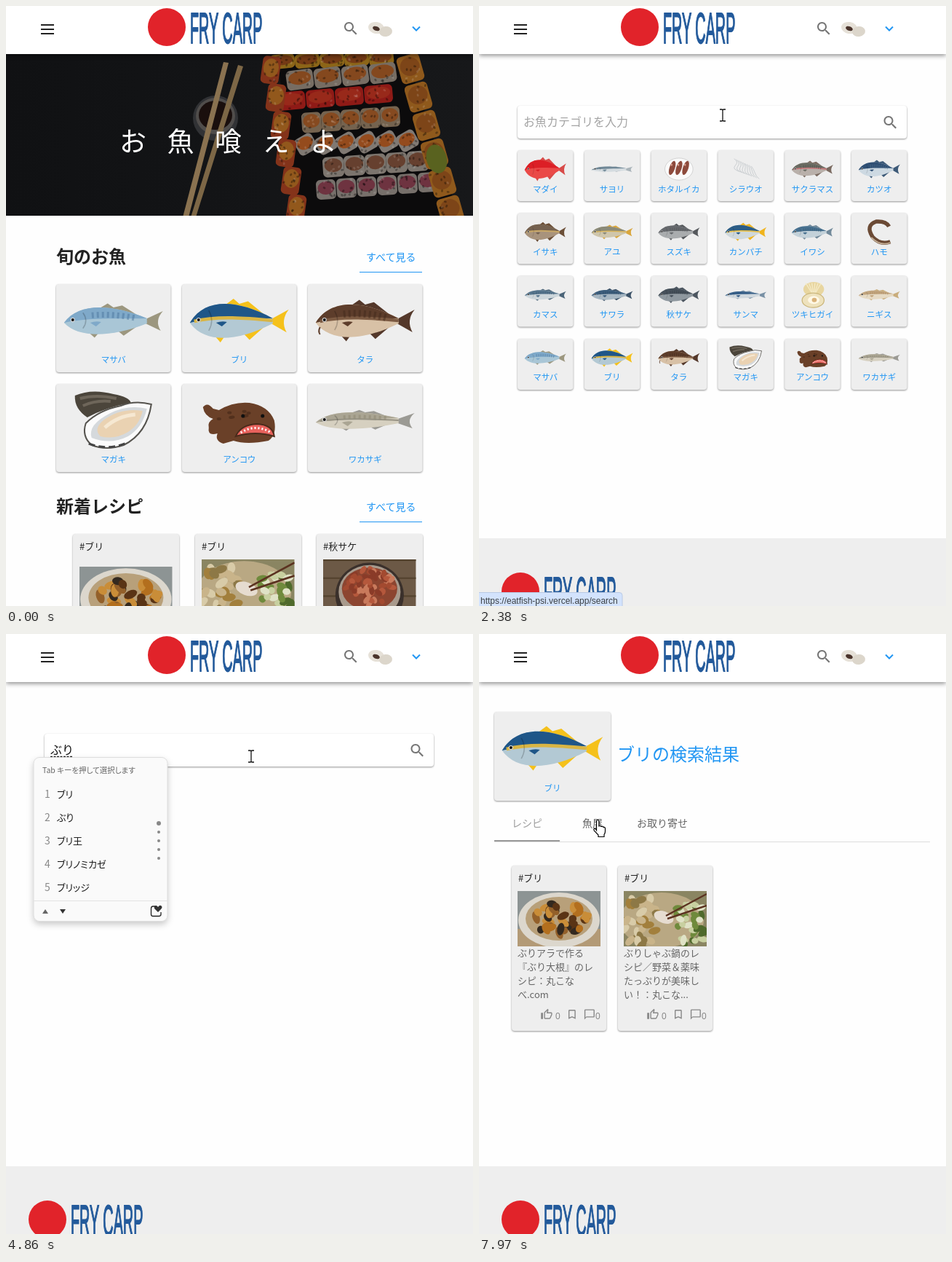
An HTML page for the animation above (8 s loop, 642 by 824 pixels).

```html
<!DOCTYPE html>
<html lang="ja">
<head>
<meta charset="utf-8">
<style>
html, body { margin: 0; width: 100%; height: 100%; overflow: hidden; background: #fff; }
svg { display: block; }
#stage { width: 642px; height: 824px; font-family: "Noto Sans CJK JP", "Noto Sans CJK", "Noto Sans", sans-serif; }
.card { filter: drop-shadow(0 1px 1px rgba(0,0,0,.42)); }
.link { fill: #2196f3; font-weight: 300; }
.mid { text-anchor: middle; }
.ime { font-feature-settings: "palt"; }
.latin { font-family: "Liberation Sans", Arial, sans-serif; }
</style>
</head>
<body>
<svg id="stage" viewBox="0 0 642 824" xmlns="http://www.w3.org/2000/svg"></svg>
<script>
const LOOP = 8000, BLUE = '#2196f3';
const stage = document.getElementById('stage');

let seed = 7;
const rnd = () => (seed = (seed * 16807) % 2147483647) / 2147483647;
const times = (n, f) => Array.from({ length: n }, (_, i) => f(i)).join('');

// basic shapes
const rect = (x, y, w, h, fill, r = 0, more = '') =>
  `<rect x="${x}" y="${y}" width="${w}" height="${h}" rx="${r}" fill="${fill}" ${more}/>`;
const oval = (x, y, rx, ry, fill, a = 0, more = '') =>
  `<ellipse rx="${rx}" ry="${ry}" fill="${fill}" transform="translate(${x} ${y}) rotate(${a})" ${more}/>`;
const path = (d, fill, more = '') => `<path d="${d}" fill="${fill}" ${more}/>`;
const line = (d, stroke, w = 1, more = '') => path(d, 'none', `stroke="${stroke}" stroke-width="${w}" ${more}`);
const text = (x, y, size, fill, s, more = '') =>
  `<text x="${x}" y="${y}" font-size="${size}" fill="${fill}" ${more}>${s}</text>`;
const move = (x, y, s, inner) => `<g transform="translate(${x} ${y}) scale(${s})">${inner}</g>`;
const group = (id, inner, more = '') => `<g id="${id}" ${more}>${inner}</g>`;

// icons
const LENS = 'M15.5 14h-.79l-.28-.27C15.41 12.59 16 11.11 16 9.5 16 5.91 13.09 3 9.5 3S3 5.91 3 9.5 5.91 16 9.5 16c1.61 0 3.09-.59 4.23-1.57l.27.28v.79l5 4.99L20.49 19l-4.99-5zm-6 0C7.01 14 5 11.99 5 9.5S7.01 5 9.5 5 14 7.01 14 9.5 11.99 14 9.5 14z';
const THUMB = 'M9 21h9c.83 0 1.54-.5 1.84-1.22l3.02-7.05c.09-.23.14-.47.14-.73v-2c0-1.1-.9-2-2-2h-6.31l.95-4.57.03-.32c0-.41-.17-.79-.44-1.06L14.17 1 7.58 7.59C7.22 7.95 7 8.45 7 9v10c0 1.1.9 2 2 2zM9 9l4.34-4.34L12 10h9v2l-3 7H9V9zM1 9h4v12H1z';
const MARK = 'M17 3H7c-1.1 0-2 .9-2 2v16l7-3 7 3V5c0-1.1-.9-2-2-2zm0 15-5-2.18L7 18V5h10v13z';
const CHAT = 'M20 2H4c-1.1 0-2 .9-2 2v18l4-4h14c1.1 0 2-.9 2-2V4c0-1.1-.9-2-2-2zm0 14H6l-2 2V4h16v12z';

// fish, 136 wide and centred on 0,0
function fish(h, back, belly, fin, stripe, bars) {
  const top = `M-68 3C-48 ${-1.35 * h} -4 ${-1.3 * h} 46 -3`;
  return path(`M42 -1L68 ${-5 - h * .45}Q56 0 65 ${6 + h * .45}L42 3Z`, fin) +
    path(`M-22 ${-.85 * h}L-8 ${-1.3 * h}L0 ${-h}L12 ${-1.15 * h}L36 ${-.3 * h}Z`, fin) +
    path(`M-36 ${.8 * h}L-26 ${1.3 * h}L-18 ${.8 * h}ZM4 ${.7 * h}L14 ${1.15 * h}L36 ${.3 * h}Z`, fin) +
    path(`${top}V4C-4 ${1.3 * h} -48 ${1.35 * h} -68 3Z`, belly) +
    path(`${top}C10 ${-.1 * h} -30 ${-.3 * h} -68 3Z`, back) +
    (stripe ? line(`M-62 1C-30 ${-.3 * h} 10 ${-.15 * h} 46 0`, stripe, h * .2) : '') +
    (bars ? line(`M-30 ${-.4 * h}Q0 ${-.55 * h} 32 -3`, bars, h * .45, 'stroke-dasharray="3 4" opacity=".45"') : '') +
    line(`M-42 ${-.6 * h}Q-34 0 -42 ${.6 * h}`, '#0003', 1.5) +
    path('M-32 3Q-24 0 -17 2L-24 8Z', back) +
    `<circle cx="-56" cy="-1" r="3" fill="#ddd"/><circle cx="-56" cy="-1" r="2" fill="#111"/>`;
}
const oyster = path('M-53 -34Q-30 -44 0 -36Q22 -32 24 -24Q-10 -18 -36 -4Q-54 -16 -53 -34Z', '#4b453b') +
  line('M-46 -30Q-24 -36 4 -30M-42 -20Q-24 -28 -4 -26', '#6e665a', 4) +
  path('M52 -22Q30 -28 10 -20Q-20 -14 -38 4Q-44 22 -30 34Q-10 42 14 34Q46 18 52 -22Z', '#fbfbfb', 'stroke="#55534e" stroke-width="2"') +
  path('M46 -16Q20 -22 -4 -10Q-36 6 -30 24Q-4 34 20 22Q40 10 46 -16Z', '#d5d9dc') +
  path('M40 -13Q10 -18 -14 0Q-28 12 -18 22Q2 27 20 16Q36 6 40 -13Z', '#ead2b2') +
  line('M-12 10Q6 -6 30 -8', '#f6e8d2', 5) + line('M-34 32Q-8 42 18 31', '#444', 3, 'stroke-dasharray="9 5"');
const angler = path('M-50 -18Q-44 -26 -36 -16L-28 -14Q-8 -26 14 -24Q40 -20 48 0Q52 20 40 28Q10 34 -8 28L-22 32Q-34 28 -30 18Q-44 22 -42 10Q-44 2 -36 -2Q-48 -6 -50 -18Z', '#6a4028') +
  path('M-5 22Q2 6 24 5Q46 6 48 22Q22 14 -5 22Z', '#e8625c', 'stroke="#4a2b1b" stroke-width="2"') +
  line('M2 17Q22 4 44 17', '#fff', 3, 'stroke-dasharray="2 3"') +
  times(9, () => oval(-28 + rnd() * 50, -13 + rnd() * 12, 3, 2, '#52301d')) +
  oval(5, -6, 2.5, 2.5, '#111') + oval(32, -6, 2.5, 2.5, '#111');
const squid = oval(0, 0, 46, 36, '#fafafa', 0, 'stroke="#ccc" stroke-width="2"') +
  times(3, i => oval(-22 + i * 22, -4, 9, 24, '#8d4a3c', 18) + oval(-24 + i * 22, -14, 3, 4, '#d9a091'));
const icefish = times(9, i => line(`M${-38 + i * 7} ${-34 + i * 3}q${16 - i} 10 ${4 + i} 22t14 20`, '#c3c7cb', 2));
const eel = line('M36 32Q4 44 -22 16Q-46 -22 -10 -34Q22 -36 32 -18', '#6b4a35', 13) + line('M36 35Q4 48 -26 18', '#c9b49b', 4);
const shell = oval(4, -18, 34, 24, '#e8d6a0') + times(6, i => line(`M4 4L${-22 + i * 10} -38`, '#f5ebc8', 3)) +
  oval(2, 18, 36, 24, '#eee2bd', 0, 'stroke="#cbb67b" stroke-width="3"') + oval(4, 17, 19, 13, '#fff8e6') + oval(6, 17, 8, 7, '#d9b27a');

const ART = {
  マダイ: fish(30, '#dc1f26', '#ea4a48', '#d84a48'),
  サヨリ: fish(8, '#6f8796', '#d5dce0', '#aab4ba'),
  ホタルイカ: squid, シラウオ: icefish,
  サクラマス: fish(21, '#6a6b62', '#b9b0aa', '#7a6a60', '#c4787a', '#4c4c46'),
  カツオ: fish(23, '#2f4f74', '#cdd9e2', '#3d5a78', '', '#54748f'),
  イサキ: fish(25, '#75614f', '#a8937c', '#6b4e36', '#c9a867'),
  アユ: fish(18, '#8b8a78', '#cfc6ac', '#d9a63c', '#d8b45a'),
  スズキ: fish(21, '#66696d', '#a9acae', '#55585c', '', '#4f5256'),
  カンパチ: fish(23, '#2c5d86', '#cfd8dc', '#f0b41c', '#e8c04a'),
  イワシ: fish(19, '#47708f', '#c3d1d9', '#71899a', '', '#33566f'),
  ハモ: eel,
  カマス: fish(15, '#55748c', '#cdd6db', '#4b6478', '', '#35536c'),
  サワラ: fish(16, '#3c5d7c', '#a6b6c2', '#3c5268', '', '#2b4860'),
  秋サケ: fish(21, '#46505a', '#8f989f', '#4c5660', '', '#333c45'),
  サンマ: fish(11, '#375f88', '#d0d8de', '#7890a5'),
  ツキヒガイ: shell,
  ニギス: fish(14, '#c1a47e', '#e6dac4', '#c9ad7d', '', '#a88558'),
  マサバ: fish(18, '#7fa9c9', '#a9c6d6', '#9c977f', '', '#456f97'),
  ブリ: fish(23, '#1f5688', '#b3c9d4', '#f5c11b', '#d9b544'),
  タラ: fish(22, '#5d3d2b', '#d8c1a6', '#54382a', '#7c5a42', '#3e271a') + line('M-62 9q-3 6 0 10', '#5d3d2b', 2),
  マガキ: oyster, アンコウ: angler,
  ワカサギ: fish(11, '#aaa593', '#d6d0c0', '#9b9a94', '#969283', '#87806c'),
};

const tile = (name, x, y, w, h, s, cy, ly, size) =>
  rect(x, y, w, h, '#eee', 4, 'class="card"') + move(x + w / 2, y + cy, s, ART[name]) +
  text(x + w / 2, y + ly, size, BLUE, name, 'class="link mid"');
const smallTile = (name, x, y) => tile(name, x, y, 76.5, 70, .42, 26, 57.5, 11.5);

// photos reduced to flat shapes
const chunks = (n, cx, cy, rx, ry, r, colors) => times(n, i => {
  const a = rnd() * 6.28, d = Math.sqrt(rnd());
  return oval(cx + rx * d * Math.cos(a), cy + ry * d * Math.sin(a), r * (.7 + rnd() * .6), r * .7, colors[i % colors.length], rnd() * 180);
});
const photo = (x, y, s, art) =>
  `<svg x="${x}" y="${y}" width="${114 * s}" height="${76 * s}" viewBox="0 0 114 76">${art}</svg>`;
const stew = rect(0, 0, 114, 76, '#8d9494') + rect(0, 52, 114, 24, '#b39a76') + oval(57, 40, 56, 38, '#dcd7cd') +
  oval(57, 38, 46, 30, '#b8a07a') + chunks(38, 57, 37, 38, 24, 7, ['#b36f1e', '#5a3415', '#c98d38', '#93602a', '#33291f']);
const hotpot = rect(0, 0, 114, 76, '#8a8562') + oval(52, 40, 58, 38, '#b9a883') +
  chunks(34, 22, 40, 26, 36, 7, ['#c9b48a', '#8d7846', '#d8cba8', '#a27f3c']) +
  chunks(30, 92, 44, 24, 32, 6, ['#6f8a3c', '#c8d0a0', '#4f6a2c', '#dfe2c6']) +
  oval(55, 36, 14, 8, '#e6dcd0', 20) + line('M58 34L114 4M60 38L114 20', '#5b3220', 2.4);
const flakes = rect(0, 0, 114, 90, '#6c5946') + times(4, i => rect(0, i * 22, 114, 2, '#54432f')) +
  oval(57, 44, 42, 40, '#3a302b') + oval(57, 40, 38, 33, '#a89a8c') + oval(57, 36, 34, 26, '#8c4530') +
  chunks(60, 57, 34, 30, 22, 4.5, ['#b5583c', '#8a3b28', '#c97a5c', '#a34a30']);

// a line of sushi pieces: first place, step, size, tilt, colours
const row = (n, x, y, dx, dy, w, h, a, base, top) => times(n, i =>
  `<g transform="translate(${x + i * dx} ${y + i * dy}) rotate(${a})">` +
  rect(-w / 2, -h / 2, w, h, base, 6) + oval(0, -h * .08, w * .42, h * .34, top) +
  times(10, () => oval((rnd() - .5) * w * .85, (rnd() - .5) * h * .85, 2, 1.4, rnd() < .7 ? '#0005' : '#fff2', rnd() * 180)) + '</g>');
const hero = `<svg x="0" y="66" width="642" height="222" viewBox="0 66 642 222">` +
  '<linearGradient id="slate"><stop stop-color="#101113"/><stop offset="1" stop-color="#17181a"/></linearGradient>' +
  rect(0, 66, 642, 222, 'url(#slate)') +
  path('M372 60H548L626 300H400Z', '#0c0b0c') +
  oval(288, 154, 31, 31, '#313235') + oval(288, 151, 27, 25, '#504d4b') + oval(288, 150, 23, 20, '#1a0f0d') +
  path('M299 77L306 78L251 290H243Z', '#8a7250') + path('M319 81L326 83L261 290H254Z', '#7d6746') +
  row(5, 380, 76, 34, -1, 34, 20, -6, '#8c6518', '#743a15') +
  row(4, 404, 101, 38, -3, 37, 27, -8, '#776d63', '#84481e') +
  row(4, 392, 130, 40, -3, 39, 25, -5, '#8e1a16', '#98291a') +
  row(5, 420, 160, 27, -2, 27, 28, -4, '#75634f', '#864a20') +
  row(6, 412, 190, 28, -1, 27, 25, -30, '#807973', '#944b1d') +
  row(5, 450, 221, 29, -2, 29, 28, -4, '#7c756e', '#66402f') +
  row(6, 440, 252, 28, -2, 27, 27, -4, '#77706b', '#6e3340') +
  row(6, 364, 88, 7, 38, 25, 38, 8, '#84331a', '#92581c') +
  row(6, 556, 86, 11, 39, 32, 38, -16, '#8f591c', '#7d4518') +
  oval(592, 210, 14, 20, '#59621f', -15) + '</svg>';

// shared header and logo
const logo = `<circle cx="221" cy="29" r="26" fill="#e1232a"/>` +
  `<g transform="translate(253 51) scale(.33 1)">` +
  text(0, 0, 60, '#235a9b', 'FRY CARP', 'class="latin" stroke="#235a9b" stroke-width="2"') + '</g>';
const header = rect(0, 0, 642, 66, '#fff', 0, 'style="filter:drop-shadow(0 2px 3px rgba(0,0,0,.45))"') +
  times(3, i => rect(48, 25 + i * 6, 18, 2, '#222')) + logo +
  oval(509, 30, 11, 8, '#e6e1d8', 10) + oval(509, 31, 5, 3, '#4a342c', 20) + oval(522, 35, 9, 7, '#dcd6cb', -8) +
  group('hover', '<circle cx="474" cy="31.5" r="21.5" fill="#000" opacity=".06"/><circle id="ripple" cx="474.5" cy="30.5" fill="#000"/>') +
  move(462, 19, 1, path(LENS, '#757575')) + line('M559 28.5L564 33.5L569 28.5', BLUE, 2);
const footer = rect(0, 731, 642, 93, '#eee') + `<g transform="translate(-164 775)">${logo}</g>`;

// pages
const section = (y, s) => text(69, y, 24, '#222', s, 'font-weight="700"') +
  text(495, y - 3, 14, BLUE, 'すべて見る', 'class="link"') + rect(486, y + 12, 86, 1, BLUE);
const recipe = (x, tag, py, art) => rect(x, 725, 146, 120, '#eee', 4, 'class="card"') +
  text(x + 9, 747, 13, '#222', tag) + photo(x + 9, py, 1.12, art);
const home = hero + text(156, 200, 37, '#fff', 'お魚喰えよ', 'letter-spacing="28.5" font-weight="300"') +
  section(353, '旬のお魚') + section(696, '新着レシピ') +
  ['マサバ', 'ブリ', 'タラ', 'マガキ', 'アンコウ', 'ワカサギ'].map((n, i) =>
    tile(n, 69 + i % 3 * 173, i < 3 ? 382 : 519, 157.5, 121, 1, 50, 108, 11.5)).join('') +
  recipe(92, '#ブリ', 770, stew) + recipe(260, '#ブリ', 760, hotpot) + recipe(427, '#秋サケ', 760, flakes);

const grid = Object.keys(ART).map((n, i) => smallTile(n, 53 + i % 6 * 91.8, 198 + Math.floor(i / 6) * 86.3)).join('');
const popup = `<rect id="panel" x="38" y="169.5" width="184" height="225" rx="8" fill="#fafafa" stroke="#ddd" style="filter:drop-shadow(0 4px 4px rgba(0,0,0,.2))"/>` +
  group('pick', rect(43, 206, 160, 29, '#eaeaea', 4) + rect(43, 213, 3, 15, '#0067c0', 1)) +
  text(50, 191, 10.5, '#666', 'Tab キーを押して選択します') +
  ['ブリ', 'ぶり', 'ブリ王', 'ブリノミカゼ', 'ブリッジ'].map((s, i) =>
    text(53, 225 + i * 32, 14, '#888', i + 1) + text(70, 225 + i * 32, 13, '#1a1a1a', s)).join('') +
  times(5, i => `<circle cx="210" cy="${260 + i * 12}" r="${i ? 2 : 3}" fill="#888"/>`) +
  line('M38 366.5H222', '#e3e3e3') + path('M50 384L54 378L58 384Z', '#666') + path('M74 378H82L78 384Z', '#333') +
  line('M207 374H202Q199.5 374 199.5 377V385Q199.5 387.5 202 387.5H210Q213 387.5 213 385V382', '#222', 1.3) +
  path('M209 382L204 377Q203 373 206 373Q208 373 209 375Q211 372 213 373Q216 375 213 378Z', '#333');
const search = rect(53, 137, 535, 45, '#fff', 4, 'class="card"') + move(553.5, 148, 1, path(LENS, '#757575')) +
  text(61, 165, 16, '#a4a4a4', 'お魚カテゴリを入力', 'id="hint"') + text(61, 165, 16, '#111', '', 'id="typed"') +
  group('grid', grid) + group('found', smallTile('ブリ', 53, 198)) +
  `<path id="wave" fill="none" stroke="#222" stroke-width="1.4" stroke-dasharray="3 1.5"/>` +
  rect(61, 150, 1, 19, '#111', 0, 'id="caret"') + group('popup', popup, 'class="ime"');

const post = (x, art, lines) => rect(x, 318, 130, 227, '#eee', 4, 'class="card"') +
  text(x + 9, 340, 13, '#222', '#ブリ') + photo(x + 8, 353, 1, art) +
  lines.map((s, i) => text(x + 8, 443 + i * 19, 13, '#666', s)).join('') +
  move(x + 39.5, 514, .7, path(THUMB, '#888')) + move(x + 74.5, 514, .7, path(MARK, '#888')) + move(x + 98.5, 514, .7, path(CHAT, '#888')) +
  text(x + 60, 529, 12, '#888', '0', 'class="latin"') + text(x + 115, 529, 12, '#888', '0', 'class="latin"');
const result = tile('ブリ', 21, 107, 160, 122, 1.02, 50, 109, 11.5) +
  text(190, 174, 24, BLUE, 'ブリの検索結果', 'class="link"') + rect(21, 285, 599, 1, '#ddd') + rect(21, 283, 90, 2, '#999') +
  text(45, 265, 14, '#9e9e9e', 'レシピ') + text(142, 265, 14, '#666', '魚屋') + text(217, 265, 14, '#666', 'お取り寄せ') +
  group('posts', post(45, stew, ['ぶりアラで作る', '『ぶり大根』のレ', 'シピ：丸こな', 'べ.com']) +
    post(191, hotpot, ['ぶりしゃぶ鍋のレ', 'シピ／野菜＆薬味', 'たっぷりが美味し', 'い！：丸こな...']));

const cursors =
  group('arrow', path('M0 0V17L4 13.2L6.6 19L9 18L6.5 12.3H12Z', '#fff', 'stroke="#000"')) +
  group('beam', line('M-4 -8H-1L0 -7L1 -8H4M-4 8H-1L0 7L1 8H4M0 -7V7', '#111', 1.3)) +
  group('hand', path('M-1.5 14.5V2.2a1.7 1.7 0 0 1 3.4 0V9.5q.3-1.5 1.8-1.2 1.3.2 1.3 1.7.2-1 1.6-.8 1.3.2 1.3 1.6.3-.8 1.4-.5 1.2.3 1.2 1.8V16q0 2.5-1.5 4.5V23.5H1v-2.5L-4.8 14.8Q-5.8 13-4.5 12.2-3.2 11.6-1.5 14.5Z', '#fff', 'stroke="#000" stroke-width="1.2"'));

stage.innerHTML = rect(0, 0, 642, 824, '#fefefe') +
  group('home', home) + group('foot', footer) + group('search', search) + group('result', result) + header +
  group('status', rect(-4, 805.5, 201, 24, '#d3e3fd', 4, 'id="bar" stroke="#b9c9e4"') + text(2, 821, 12, '#3c4043', '', 'id="url" class="latin"')) +
  `<circle id="click" cx="335" cy="167" r="12" fill="#000" opacity=".13"/>` + group('cursor', cursors);

const $ = {};
stage.querySelectorAll('[id]').forEach(el => $[el.id] = el);
const show = (id, on) => $[id].setAttribute('visibility', on ? 'inherit' : 'hidden');
const put = (id, attrs) => { for (const k in attrs) $[id].setAttribute(k, attrs[k]); };
const ramp = (t, a, b) => Math.min(1, Math.max(0, (t - a) / (b - a)));
const ease = k => k * k * (3 - 2 * k);
// last entry whose start time has passed
const pickAt = (list, t) => list.reduce((v, [start, val]) => t >= start ? val : v, list[0][1]);

const TRACK = [
  [260, 559, 784], [540, 344, 172], [870, 344, 172], [1200, 438, 85], [1330, 480, 42], [1430, 471, 33], [1900, 471, 32], [2130, 471, 32],
  [2380, 335, 150], [2510, 335, 150], [2710, 337, 168], [6120, 337, 168], [6420, 79, 239], [7760, 79, 239], [7970, 163, 255]];
const SHAPE = [[0, 'arrow'], [500, 'beam'], [900, 'arrow'], [1390, 'hand'], [2190, 'arrow'], [2330, 'beam'], [6170, 'arrow'], [6330, 'hand']];
const TYPED = [[0, ''], [3920, 'ｂ'], [4060, 'ぶ'], [4190, 'ぶｒ'], [4330, 'ぶり'], [5190, 'ブリ']];

function pointer(t) {
  const i = Math.max(1, TRACK.findIndex(k => k[0] > t));
  const last = TRACK[TRACK.length - 1];
  if (t >= last[0]) return [last[1], last[2]];
  const [a, x, y] = TRACK[i - 1], [b, u, v] = TRACK[i];
  const k = ease(ramp(t, a, b));
  return [x + (u - x) * k, y + (v - y) * k];
}

function render(t) {
  const page = pickAt([[0, 'home'], [2100, 'search'], [6950, 'result']], t);
  ['home', 'search', 'result'].forEach(p => show(p, p === page));
  show('foot', page !== 'home');
  show('posts', t >= 7080);

  const ripple = ramp(t, 1740, 2060);
  put('hover', { opacity: ramp(t, 1430, 1640) * (1 - ramp(t, 2170, 2300)) });
  put('ripple', { r: 5 + 16 * ripple, opacity: ripple ? .16 * (1 - ramp(t, 2000, 2250)) : 0 });

  const typed = pickAt(TYPED, t), end = 61 + 16 * typed.length;
  $.typed.textContent = typed;
  show('hint', !typed);
  show('grid', !typed);
  show('found', t >= 5190);
  show('wave', typed && t < 5590);
  put('wave', { d: `M61 168.5H${end - 1}` });
  show('caret', (t >= 2910 && t < 3460) || (t >= 3920 && t < 4860));
  put('caret', { x: typed ? end : 61 });

  const wide = t >= 5190;
  show('popup', t >= 4130 && t < 5590);
  show('pick', wide);
  put('panel', { width: wide ? 212 : 184 });

  const grow = ease(ramp(t, 6330, 6520));
  put('found', { transform: `translate(91 233.5) scale(${1 + .24 * grow}) translate(-91 -233.5)` });

  const late = t > 6000;
  $.url.textContent = 'https://eatfish-psi.vercel.app/search' + (late ? '/12' : '');
  put('bar', { width: late ? 215 : 201 });
  put('status', { opacity: late ? ramp(t, 6680, 6810) * (1 - ramp(t, 7430, 7560)) : ramp(t, 1630, 1760) * (1 - ramp(t, 2510, 2650)) });

  const [x, y] = pointer(t), shape = pickAt(SHAPE, t);
  show('cursor', t >= 260);
  put('cursor', { transform: `translate(${x} ${y})` });
  ['arrow', 'beam', 'hand'].forEach(s => show(s, s === shape));
  show('click', t >= 2910 && t < 3130);
}

const start = performance.now();
function tick() {
  render((performance.now() - start) % LOOP);
  requestAnimationFrame(tick);
}
tick();
</script>
</body>
</html>
```
